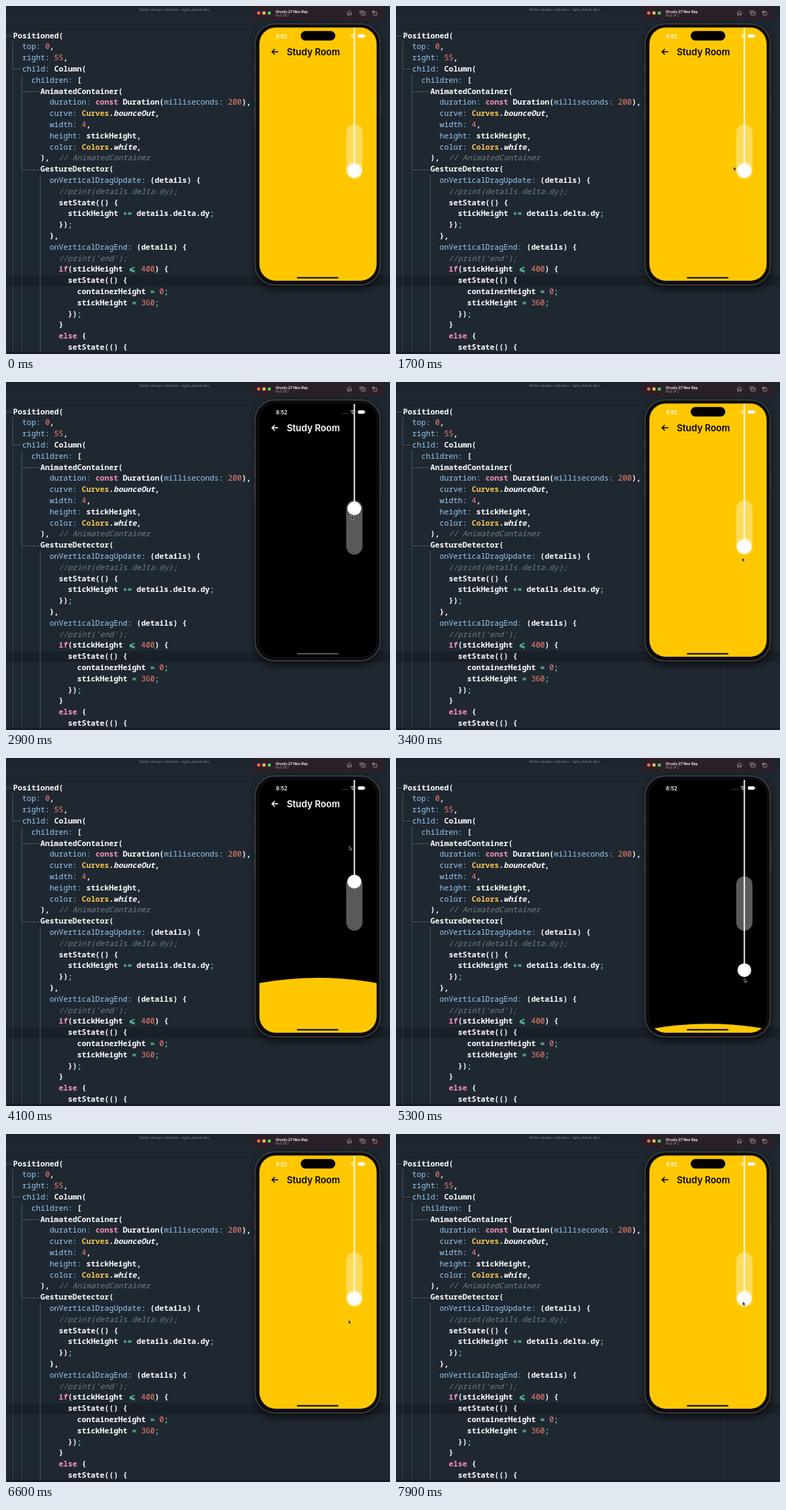
An HTML page that plays this animation: 544 by 494 pixels, repeating every 8000 ms.

```html
<!DOCTYPE html>
<html lang="en">
<head>
<meta charset="utf-8">
<title>Light switch</title>
<style>
  html, body { margin: 0; width: 100%; height: 100%; overflow: hidden; background: #1f2831; }
  svg, pre { position: absolute; left: 0; top: 0; }
  svg { font-family: Inter, Roboto, sans-serif; }
  pre {
    margin: 0; left: 10px; top: 33.6px; color: #fff;
    font: 600 10.8px/15.8px "Noto Sans Mono", "DejaVu Sans Mono", monospace;
    font-variant-ligatures: none;
  }
  .prop { color: #9acbf5; font-weight: 500; }
  .key { color: #f896ba; font-weight: 700; }
  .type { color: #f9c648; }
  .field { font-style: italic; }
  .num { color: #f5836f; font-weight: 500; }
  .op { color: #58c99a; }
  .note { color: #727e86; font-style: italic; font-weight: 400; }
  .le { display: inline-block; width: 2ch; line-height: 0; text-align: center; }
  .guide { fill: none; stroke: #46525c; stroke-width: 1; }
  .icon { fill: none; stroke: #a59ca3; stroke-width: .8; }
</style>
</head>
<body>
<svg width="544" height="494" viewBox="0 0 544 494">
  <defs>
    <clipPath id="screen"><rect x="359" y="30.5" width="166" height="359.5" rx="23"/></clipPath>
    <filter id="blur" x="-50%" y="-50%" width="200%" height="200%"><feGaussianBlur stdDeviation="1.3"/></filter>
    <filter id="shade" x="-20%" y="-20%" width="140%" height="140%"><feGaussianBlur stdDeviation="6"/></filter>
  </defs>

  <!-- editor -->
  <rect width="544" height="494" fill="#1f2831"/>
  <rect width="544" height="11" fill="#1c242c"/>
  <path d="M0 22.5H544M0 32.5H544" stroke="#1a222a"/>
  <rect y="382" width="544" height="16" fill="#192027"/>
  <path d="M464.5 398V491" stroke="#2b353e"/>
  <rect y="491" width="544" height="3" fill="#171b27"/>
  <text x="189" y="7.4" font-size="4.75" font-weight="600" fill="#66727b">flutter-design-collection – light_switch.dart</text>
  <path class="guide" d="M0 42.5H8M9.500 50V89.500H21M22.500 97V232.500H48M22.500 121.500H48M48.500 240V491"/>
  <path class="guide" d="M9.500 90V491M22.500 233V491" opacity=".45"/>

  <!-- simulator window -->
  <rect x="354" y="28" width="176" height="374" rx="28" fill="#000" opacity=".65" filter="url(#shade)"/>
  <path d="M348 0H536V16a4 4 0 0 1-4 4H352a4 4 0 0 1-4-4Z" fill="#2b2028"/>
  <circle cx="358" cy="10" r="2.400" fill="#f4605a"/>
  <circle cx="365.500" cy="10" r="2.400" fill="#f5bd4f"/>
  <circle cx="373" cy="10" r="2.400" fill="#5cc454"/>
  <text x="382" y="9.600" font-size="5.100" font-weight="700" fill="#eee6ea">Orvelo 27 Neo Ray</text>
  <text x="382" y="15.200" font-size="4.200" fill="#9b9198">NuQ 38.2</text>
  <path class="icon" d="M483 10 486.500 6.500 490 10M484 9.500V13H485.500V10.800H487.500V13H489V9.500"/>
  <path class="icon" d="M501.500 11V7H507M503.500 8.500H509V13H503.500ZM505.300 10.700H507.200"/>
  <path class="icon" d="M520.500 8.500H525V13H520.500ZM519 10V7.500H522M520.800 6.200 522 7.500 520.800 8.700"/>

  <!-- phone -->
  <rect x="353" y="25.500" width="177" height="370.500" rx="28" fill="#0c0c0e" stroke="#454347" stroke-width="1.400"/>
  <path d="M352 82V94M352 113V134M352 142V163M531 124V157" stroke="#39383c" stroke-width="1.200"/>
  <g clip-path="url(#screen)">
    <rect x="359" y="30" width="166" height="361" fill="#000"/>
    <path id="light" fill="#ffc700"/>
  </g>
  <rect x="417.500" y="35.500" width="49" height="13.500" rx="6.750" fill="#000"/>
  <g fill="#fff">
    <text x="382.500" y="45.600" font-size="7.300" font-weight="600">8:52</text>
    <path d="M476.500 44.500H485" stroke="#fff" stroke-width="1.100" stroke-dasharray="1.100 1.300" opacity=".45"/>
    <path d="M487.700 41.800a4.800 4.800 0 0 1 6.800 0M489.200 43.400a2.700 2.700 0 0 1 3.800 0" fill="none" stroke="#fff" stroke-width=".9"/>
    <circle cx="491.100" cy="44.900" r=".8"/>
    <rect x="498.500" y="40.200" width="9.500" height="4.800" rx="1.500"/>
    <rect x="508.600" y="41.700" width=".9" height="1.800" rx=".4"/>
  </g>
  <g id="title">
    <path d="M385.500 65H377M380.800 61 376.800 65 380.800 69" fill="none" stroke="currentColor" stroke-width="1.300"/>
    <text x="397.700" y="69.600" font-size="12.900" font-weight="600" fill="currentColor">Study Room</text>
  </g>
  <rect id="home" x="412" y="384.800" width="59" height="2" rx="1"/>
  <rect x="482" y="168" width="23" height="77" rx="11.500" fill="#fff" opacity=".35"/>
  <path id="rope" stroke="#fff" stroke-width="1.800"/>
  <g id="knob" fill="#fff">
    <circle id="glow" r="10.800" filter="url(#blur)"/>
    <circle r="9.700"/>
  </g>
  <path id="cursor" d="M-1.800-3.200V2.600L-.5 1.400.5 3.500 1.400 3 .5 1.100H2.300Z" fill="#111" stroke="#fff" stroke-width=".5" stroke-opacity=".8"/>
</svg>
<pre id="code"></pre>

<script>
const $ = id => document.getElementById(id);

const source = `Positioned(
  top: 0,
  right: 55,
  child: Column(
    children: [
      AnimatedContainer(
        duration: const Duration(milliseconds: 200),
        curve: Curves.bounceOut,
        width: 4,
        height: stickHeight,
        color: Colors.white,
      ),  // AnimatedContainer
      GestureDetector(
        onVerticalDragUpdate: (details) {
          //print(details.delta.dy);
          setState(() {
            stickHeight += details.delta.dy;
          });
        },
        onVerticalDragEnd: (details) {
          //print('end');
          if(stickHeight <= 400) {
            setState(() {
              containerHeight = 0;
              stickHeight = 360;
            });
          }
          else {
            setState(() {`;

const grammar = /(?<note>\/\/.*)|(?<key>\b(?:const|if|else)\b)|(?<prop>\w+:)|(?<type>Curves|Colors)|(?<field>bounceOut|white)|(?<num>\b\d+\b)|(?<le><=)|(?<op>\+=|=|;)/g;

function highlight(text, box) {
  let last = 0;
  for (const m of text.matchAll(grammar)) {
    const [kind, word] = Object.entries(m.groups).find(g => g[1]);
    const span = document.createElement('span');
    span.className = kind === 'le' ? 'op le' : kind;
    span.textContent = kind === 'le' ? '\u2a7d' : word;
    box.append(text.slice(last, m.index), span);
    last = m.index + word.length;
  }
  box.append(text.slice(last));
}
highlight(source, $('code'));

const LOOP = 8000, STEP = 100, BOUNCE = 200, FILL = 300;
const ON_Y = 233.5, OFF_Y = 179.5, FLOOR = 390, FULL = 385, SAG = 7.5;

// pointer stops: time, x, y
const stops = [
  [800, 405, 436], [1150, 450, 330], [1450, 472, 250], [1700, 480, 231],
  [1850, 490, 247], [2220, 492, 130], [2400, 492, 150], [2700, 491, 193],
  [2900, 491, 193], [3150, 493, 320], [3450, 492, 247], [3650, 492, 247],
  [3935, 488, 128], [4150, 488, 128], [4500, 492, 194], [4650, 492, 194],
  [5295, 495, 316], [5500, 495, 318], [6100, 489, 290], [6600, 487, 267],
  [6800, 492, 247], [7100, 494, 334], [7380, 493, 247], [7450, 493, 247],
  [7700, 494, 350], [7900, 493, 241]
];

// pulls on the knob: grab time, drop time, light afterwards
const pulls = [
  [1850, 2220, 0], [2900, 3150, 1], [3650, 3935, 0],
  [4650, 5295, 1], [6800, 7100, 1], [7450, 7700, 1]
];

const clamp = v => Math.min(1, Math.max(0, v));
const mix = (a, b, k) => a + (b - a) * k;
const smooth = k => k * k * (3 - 2 * k);
const easeOut = k => 1 - (1 - k) ** 2;

function bounceOut(k) {
  const n = 7.5625, d = 2.75;
  if (k < 1 / d) return n * k * k;
  if (k < 2 / d) return n * (k - 1.5 / d) ** 2 + .75;
  if (k < 2.5 / d) return n * (k - 2.25 / d) ** 2 + .9375;
  return n * (k - 2.625 / d) ** 2 + .984375;
}

function pointer(t) {
  const i = stops.findIndex(s => s[0] > t);
  const b = stops[i < 0 ? stops.length - 1 : i];
  const a = i > 0 ? stops[i - 1] : b;
  const k = a === b ? 1 : smooth((t - a[0]) / (b[0] - a[0]));
  return [mix(a[1], b[1], k), mix(a[2], b[2], k)];
}

function lamp(t) {
  let on = 1, knob = ON_Y, level = 1;
  for (const [grab, drop, next] of pulls) {
    if (t < grab) break;
    const y = knob + pointer(Math.min(t, drop))[1] - pointer(grab)[1];
    if (t < drop) { knob = y; break; }
    knob = mix(y, next ? ON_Y : OFF_Y, bounceOut(clamp((t - drop) / BOUNCE)));
    level = mix(on, next, easeOut(clamp((t - drop) / FILL)));
    on = next;
  }
  return { on, knob, level };
}

function draw(t) {
  const { on, knob, level } = lamp(t);
  const top = FLOOR - FULL * level;
  const lit = level > .005;
  $('light').setAttribute('d', lit
    ? `M359 ${top + SAG}Q442 ${top - SAG} 525 ${top + SAG}V400H359Z` : '');
  $('title').style.color = on ? '#000' : '#fff';
  $('home').setAttribute('fill', lit ? '#0a0a0a' : '#5a5a5a');
  $('rope').setAttribute('d', `M493.500 31V${knob}`);
  $('knob').setAttribute('transform', `translate(493.500 ${knob})`);
  $('glow').setAttribute('opacity', .6 * level);
  const [x, y] = pointer(t);
  $('cursor').setAttribute('transform', `translate(${x} ${y})`);
  $('cursor').style.display = t < stops[0][0] ? 'none' : '';
}

const start = performance.now();
function tick() {
  const t = (performance.now() - start + 8) % LOOP;
  draw(Math.floor(t / STEP) * STEP);
  requestAnimationFrame(tick);
}
tick();
</script>
</body>
</html>
```
